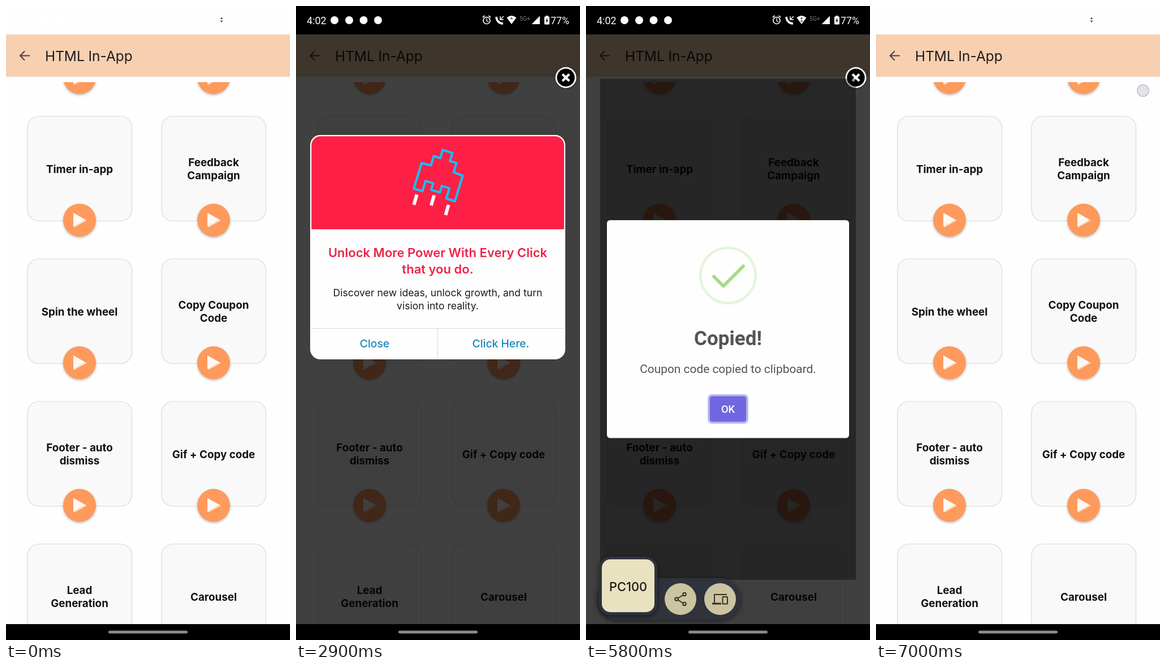
Animation of 502 by 1116 pixels, one loop 7100 ms. Source, as an HTML page with a canvas:

```html
<!DOCTYPE html>
<html lang="en">
<head>
<meta charset="utf-8">
<title>In-app message demo</title>
<style>
html, body { margin: 0; width: 100%; height: 100%; overflow: hidden; background: #fefefe; }
canvas { display: block; width: 502px; height: 1116px; }
</style>
</head>
<body>
<canvas id="stage" width="502" height="1116"></canvas>
<script>
const ctx = document.getElementById('stage').getContext('2d');
const LOOP = 7100, STEP = 100;
const UI = 'Inter, sans-serif', ROBOTO = 'Roboto, sans-serif';
const CARDS = [
  [['Timer in-app'], ['Feedback', 'Campaign']],
  [['Spin the wheel'], ['Copy Coupon', 'Code']],
  [['Footer - auto', 'dismiss'], ['Gif + Copy code']],
  [['Lead', 'Generation'], ['Carousel']]
];

const clamp = v => Math.max(0, Math.min(1, v));
const progress = (t, from, to) => clamp((t - from) / (to - from));
const easeOut = p => 1 - (1 - p) ** 3;

// Interpolates rows of [position, ...values].
function keyed(p, rows) {
  let i = 0;
  while (i < rows.length - 2 && p > rows[i + 1][0]) i++;
  const [a, b] = [rows[i], rows[i + 1]];
  const k = progress(p, a[0], b[0]);
  return a.slice(1).map((v, n) => v + (b[n + 1] - v) * k);
}

function scoped(draw) {
  ctx.save();
  draw();
  ctx.restore();
}

function rect(x, y, w, h, color) {
  ctx.fillStyle = color;
  ctx.fillRect(x, y, w, h);
}

function round(x, y, w, h, r, fill, stroke, width = 1) {
  ctx.beginPath();
  ctx.roundRect(x, y, w, h, r);
  paint(fill, stroke, width);
}

function circle(x, y, r, fill, stroke, width = 1) {
  ctx.beginPath();
  ctx.arc(x, y, r, 0, Math.PI * 2);
  paint(fill, stroke, width);
}

function poly(points, fill, stroke, width = 1, closed = true) {
  ctx.beginPath();
  points.forEach(([x, y]) => ctx.lineTo(x, y));
  if (closed) ctx.closePath();
  paint(fill, stroke, width);
}

function paint(fill, stroke, width) {
  if (fill) { ctx.fillStyle = fill; ctx.fill(); }
  if (stroke) { ctx.strokeStyle = stroke; ctx.lineWidth = width; ctx.stroke(); }
}

const line = (x1, y1, x2, y2, color, width) => poly([[x1, y1], [x2, y2]], null, color, width, false);

function text(str, x, y, font, color, align = 'center') {
  ctx.font = font;
  ctx.fillStyle = color;
  ctx.textAlign = align;
  ctx.fillText(str, x, y);
}

function shadow(color, blur, dy) {
  ctx.shadowColor = color;
  ctx.shadowBlur = blur;
  ctx.shadowOffsetY = dy;
}

function playButton(x, y) {
  scoped(() => {
    shadow('rgba(0,0,0,.25)', 4, 2);
    circle(x, y, 29, '#fd9a5c');
  });
  poly([[x - 10, y - 12], [x - 10, y + 13], [x + 13, y + .5]], '#ffd9bf');
  poly([[x - 11, y - 13], [x - 11, y + 11], [x + 10, y - 1]], '#fff8f2');
}

function page() {
  rect(0, 0, 502, 1116, '#fefefe');
  rect(0, 50, 502, 74.5, '#f6d0b1');
  line(25, 87.5, 42, 87.5, '#4b3b46', 2);
  poly([[33, 79.5], [25, 87.5], [33, 95.5]], null, '#4b3b46', 2, false);
  text('HTML In-App', 69, 97, '400 24.4px ' + UI, '#211a1c', 'left');
  scoped(() => {
    ctx.beginPath();
    ctx.rect(0, 134, 502, 954);
    ctx.clip();
    [130, 367].forEach((x, col) => {
      playButton(x, 126);
      CARDS.forEach((row, n) => {
        const y = 194 + n * 251;
        round(x - 92, y, 184.5, 184.5, 20, '#f9f9f9', '#d9d9d9', 1.2);
        const lines = row[col];
        lines.forEach((str, i) =>
          text(str, x, y + 99.5 + (i - (lines.length - 1) / 2) * 22.7, '700 18.8px ' + UI, '#111'));
        playButton(x, y + 183);
      });
    });
  });
}

function closeButton() {
  scoped(() => {
    shadow('rgba(0,0,0,.4)', 3, 1);
    circle(477, 126, 18.5, '#fff');
  });
  circle(477, 126, 15.7, '#000');
  line(471, 120, 483, 132, '#fff', 4.2);
  line(483, 120, 471, 132, '#fff', 4.2);
}

function dim(alpha) {
  if (!alpha) return;
  scoped(() => {
    ctx.globalAlpha = alpha;
    rect(0, 0, 502, 50, '#000');
    rect(0, 50, 502, 1038, 'rgba(0,0,0,.745)');
    closeButton();
  });
}

function statusBar(t) {
  const white = '#fff';
  text('4:02', 19, 31.5, '400 18px ' + ROBOTO, white, 'left');
  [68, 94, 119.5, 145].forEach(x => circle(x, 25, 7, white));
  circle(337, 25.5, 6, null, white, 1.7);
  poly([[337, 21.5], [337, 26], [340, 28]], null, white, 1.4, false);
  line(330, 20, 333.5, 17, white, 1.7);
  line(344, 20, 340.5, 17, white, 1.7);
  ctx.beginPath();
  ctx.moveTo(354, 19);
  ctx.quadraticCurveTo(355, 30, 366, 31);
  paint(null, white, 3.5);
  poly([[361, 18], [361, 24], [367, 24]], null, white, 1.5, false);
  line(361, 24, 367, 18, white, 1.5);
  ctx.beginPath();
  ctx.moveTo(381, 32);
  ctx.lineTo(372.5, 20.5);
  ctx.quadraticCurveTo(381, 13.5, 389.5, 20.5);
  ctx.closePath();
  paint(white);
  const ink = 'rgba(0,0,0,.68)';
  poly([[378.5, 23], [383.5, 23], [381, 19.5]], ink);
  if (t < 1500 || t >= 4500) poly([[378.5, 25.5], [383.5, 25.5], [381, 29]], ink);
  text('5G+', 395, 25.5, '400 10.5px ' + ROBOTO, 'rgba(255,255,255,.48)', 'left');
  poly([[416.5, 32], [431, 32], [431, 17.5]], white);
  round(439, 18.5, 9, 14, 1.5, white);
  rect(441.5, 17, 4, 2, white);
  poly([[444.5, 20.5], [441, 26.5], [443.2, 26.5], [442.5, 30.5], [446, 24.7], [443.9, 24.7]], t >= 2600 && t < 6700 ? '#222' : white);
  text('77%', 450, 31.5, '400 17.8px ' + ROBOTO, white, 'left');
}

function rocket() {
  const half = [[9, 0], [9, 15], [21, 15], [21, 32], [38, 33], [38, 80], [22, 80], [22, 61], [8, 61], [8, 73]];
  const mirrored = half.map(([x, y]) => [-x, y]).reverse();
  scoped(() => {
    ctx.translate(268, 256);
    ctx.rotate(.297);
    ctx.lineJoin = 'round';
    poly([...half, ...mirrored], null, '#1bbcf0', 4.2);
  });
  [[213.5, 332], [244, 333], [269.5, 350]].forEach(([x, y]) => line(x, y, x - 5, y + 18, '#fff', 6));
}

function popup() {
  round(25, 227, 451, 395, 18, '#fefefe');
  round(27.3, 229.3, 446.6, 163.7, [16, 16, 0, 0], '#fd1f45');
  rocket();
  const title = '600 22px ' + UI, body = '400 17.6px ' + UI, action = '500 19.3px ' + UI;
  text('Unlock More Power With Every Click', 250.5, 442, title, '#ee2348');
  text('that you do.', 250.5, 471, title, '#ee2348');
  text('Discover new ideas, unlock growth, and turn', 250.5, 510.5, body, '#1c1c1c');
  text('vision into reality.', 250.5, 533.5, body, '#1c1c1c');
  line(27, 567.5, 474, 567.5, '#d3d6da', 1);
  line(250.5, 568, 250.5, 620, '#d3d6da', 1);
  text('Close', 139, 601, action, '#1686c0');
  text('Click Here.', 362, 601, action, '#1686c0');
}

// One bar of the tick: left, top and width in em inside the ring.
function tickBar(left, top, width, angle) {
  const em = 18.55;
  if (width <= 0) return;
  scoped(() => {
    ctx.translate(204.6 + (left + width / 2) * em, 428.2 + (top + .156) * em);
    ctx.rotate(angle);
    round(-width * em / 2, -2.9, width * em, 5.8, 2.3, '#a5dc86');
  });
}

function tick(p) {
  const [left, top, width] = keyed(p, [
    [0, .06, 1.19, 0], [.54, .06, 1.06, 0], [.7, -.375, 2.19, 3.125], [.84, 1.31, 3, 1.06], [1, .8125, 2.875, 1.5625]]);
  tickBar(left, top, width, Math.PI / 4);
  const [right, longTop, length] = keyed(p, [
    [0, 2.875, 3.375, 0], [.65, 2.875, 3.375, 0], [.84, 0, 2.19, 3.44], [1, .5, 2.375, 2.9375]]);
  tickBar(5 - right - length, longTop, length, -Math.PI / 4);
}

function copiedDialog(t) {
  const start = 5050, end = 6250;
  const hide = progress(t, end, end + 150);
  if (t < start || hide === 1) return;
  rect(25, 128, 452, 882, `rgba(0,0,0,${.4 * progress(t, start, start + 100) * (1 - hide)})`);
  const scale = hide ? 1 - hide / 2
    : keyed(progress(t, start, start + 300), [[0, .7], [.45, 1.05], [.8, .95], [1, 1]])[0];
  scoped(() => {
    ctx.globalAlpha = 1 - hide;
    ctx.translate(251, 569);
    ctx.scale(scale, scale);
    ctx.translate(-251, -569);
    round(37, 377, 428, 383.5, 5.5, '#fefefe');
    circle(251, 474.5, 48.7, null, 'rgba(165,220,134,.3)', 4.6);
    tick(progress(t, start, start + 750));
    text('Copied!', 251, 597, '600 35px ' + ROBOTO, '#545454');
    text('Coupon code copied to clipboard.', 251, 646, '400 20.9px ' + ROBOTO, '#545454');
    round(215.3, 683.5, 71.4, 51.5, 7, '#b7b2ef');
    round(219, 687, 64, 44.5, 4.5, '#7066e0');
    text('OK', 251, 715.5, '500 18.3px ' + ROBOTO, '#fff');
  });
}

function clipboardToast(t) {
  const show = easeOut(progress(t, 5200, 5600));
  const alpha = show * (1 - progress(t, 6150, 6400));
  if (!alpha) return;
  const ink = '#3a3020', slate = '#30323c';
  scoped(() => {
    ctx.globalAlpha = alpha;
    ctx.translate(0, 18 * (1 - show));
    scoped(() => {
      shadow('rgba(0,0,0,.5)', 9, 2);
      round(20, 1007, 253, 74, 37, slate);
      round(23, 969, 103, 103, 20, slate);
    });
    round(28, 974, 93, 93, 15, '#e8e2c0');
    text('PC100', 74.5, 1029.5, '500 21.8px ' + UI, '#1d1b14');
    [167, 237].forEach(x => circle(x, 1044, 28, '#cac4a0'));
    poly([[174, 1035.5], [160, 1044], [174, 1052.5]], null, ink, 2, false);
    [[174, 1035.5], [160, 1044], [174, 1052.5]].forEach(([x, y]) => circle(x, y, 2.8, '#cac4a0', ink, 2));
    poly([[249, 1036], [227, 1036], [227, 1051]], null, ink, 2, false);
    line(223, 1052, 239, 1052, ink, 3);
    round(241.5, 1040, 8.5, 12.5, 1, null, ink, 2);
  });
}

function touch(x, y) {
  circle(x, y, 10.3, 'rgba(205,205,208,.56)', 'rgba(150,165,200,.75)', 1.2);
}

function render(t) {
  const within = (from, to) => t >= from && t < to;
  page();
  dim(t < 2600 ? 0 : 1 - progress(t, 6450, 6750));
  statusBar(t);
  if (within(2900, 5000)) popup();
  copiedDialog(t);
  clipboardToast(t);
  if (within(2400, 2500)) touch(366, 632);
  if (within(4900, 5100)) touch(375.5, 600);
  if (within(6200, 6300)) touch(255, 712);
  if (t >= 7000) touch(472, 149);
  rect(0, 1088, 502, 28, '#000');
  round(181, 1099.5, 140, 5, 2.5, '#8b8b8b');
}

const origin = performance.now();
function frame() {
  const elapsed = (performance.now() - origin) % LOOP;
  render(Math.floor(elapsed / STEP) * STEP);
  requestAnimationFrame(frame);
}
frame();
</script>
</body>
</html>
```
